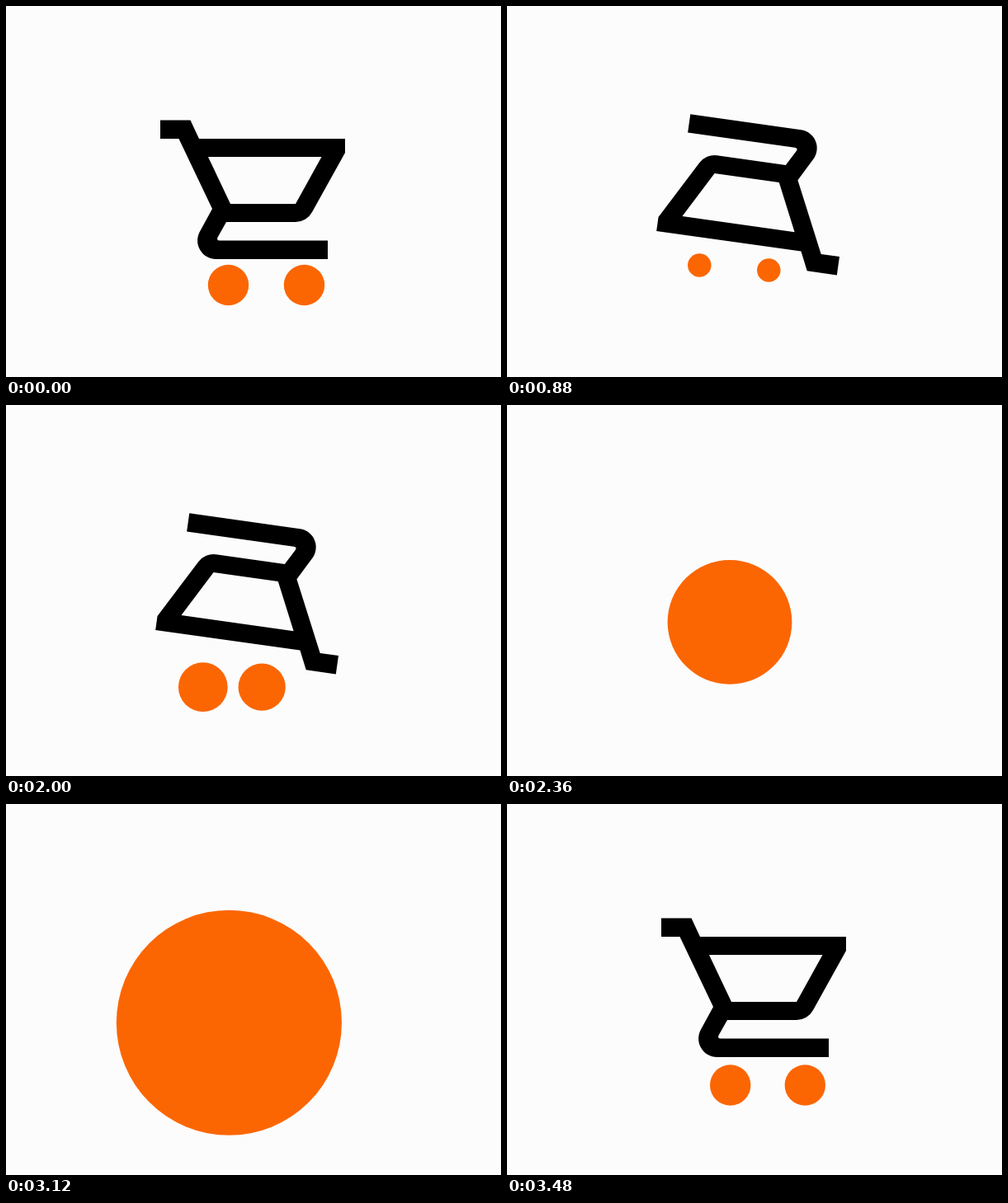
Recreate the animation shown at these times as an HTML page with a canvas. Size 600 px wide and 450 px high, loop 4400 ms.

```html
<!DOCTYPE html>
<html>
<head>
<meta charset="utf-8">
<style>
html, body { margin: 0; width: 100%; height: 100%; overflow: hidden; background: #fcfcfc; }
canvas { display: block; }
</style>
</head>
<body>
<canvas id="stage" width="600" height="450"></canvas>
<script>
const ctx = document.getElementById('stage').getContext('2d');
const LOOP = 4400, STEP = 40, R = 24.7;
const cart = new Path2D(
  'M187 138.5H223.5L234 161H411V178L371 250A22.5 22.5 0 0 1 351 262H267' +
  'L256.6 280.5Q254.8 284.5 259 284.5H390V307H254.5A22.5 22.5 0 0 1 235 273.5' +
  'L250 246L209.5 161H187ZM245 183H382.5L351 240H272Z');

// Eased value going from a to b between the times t0 and t1
function tween(t, t0, t1, a, b) {
  const x = Math.min(1, Math.max(0, (t - t0) / (t1 - t0)));
  return a + (b - a) * (1 - Math.cos(Math.PI * x)) / 2;
}

function disc(x, y, r) {
  ctx.fillStyle = '#fb6603';
  ctx.beginPath();
  ctx.arc(x, y, Math.max(0, r), 0, 7);
  ctx.fill();
}

function drawCart(deg) {
  ctx.save();
  ctx.translate(300, 225);
  ctx.rotate(deg * Math.PI / 180);
  ctx.translate(-300, -225);
  ctx.fillStyle = '#000';
  ctx.fill(cart, 'evenodd');
  ctx.restore();
}

// Wheels slip up behind the lower bar
function hideWheels(t) {
  const y = tween(t, -40, 225, 341, 296);
  const r = tween(t, 20, 370, R, 0);
  disc(tween(t, -40, 225, 270.7, 249), y, r);
  disc(tween(t, -40, 225, 361.3, 365), y, r);
}

// A wheel drops out from under the iron, overshoots and settles
function dropWheel(t, x, y0) {
  const y = t < 1200 ? tween(t, 560, 1200, y0, 359) : tween(t, 1200, 1320, 359, 356);
  const r = t < 1200 ? tween(t, 560, 1160, 0, 25.8) : tween(t, 1200, 1320, 25.8, R);
  disc(x, y, r);
}

// A wheel runs to the middle while it swells
function mergeWheel(t, x, end) {
  disc(tween(t, 1960, 2118, x, 270), tween(t, 1960, 2118, 356, 263.5),
    tween(t, 1960, end, R, 115));
}

function draw(t) {
  ctx.fillStyle = '#fcfcfc';
  ctx.fillRect(0, 0, 600, 450);
  if (t < 2240) {
    if (t < 400) {
      hideWheels(t);
    } else if (t >= 600 && t < 1960) {
      dropWheel(t, 233.3, 270);
      dropWheel(t, 317.3, 282);
    }
    const spin = Math.min(1, Math.max(0, (t - 325) / 252.7) ** 4);
    drawCart(-172 * spin);
    if (t >= 1960) {
      mergeWheel(t, 233.3, 2220);
      mergeWheel(t, 317.3, 2260);
    }
  } else if (t < 2560) {
    disc(270, 263.3, tween(t, 2227, 2560, 115, 0));
  } else if (t > 2880) {
    if (t >= 3200) {
      drawCart(0);
      disc(361.3, 341, R);
    }
    const r = t < 3200 ? tween(t, 2880, 3207, 0, 163.5) : tween(t, 3200, 3480, 163.5, R);
    disc(tween(t, 3130, 3480, 270.4, 270.7), tween(t, 3130, 3480, 265.3, 341), r);
  }
}

const start = performance.now();
function tick() {
  const t = (performance.now() - start) % LOOP;
  draw(Math.floor(t / STEP) * STEP);
  requestAnimationFrame(tick);
}
tick();
</script>
</body>
</html>
```
